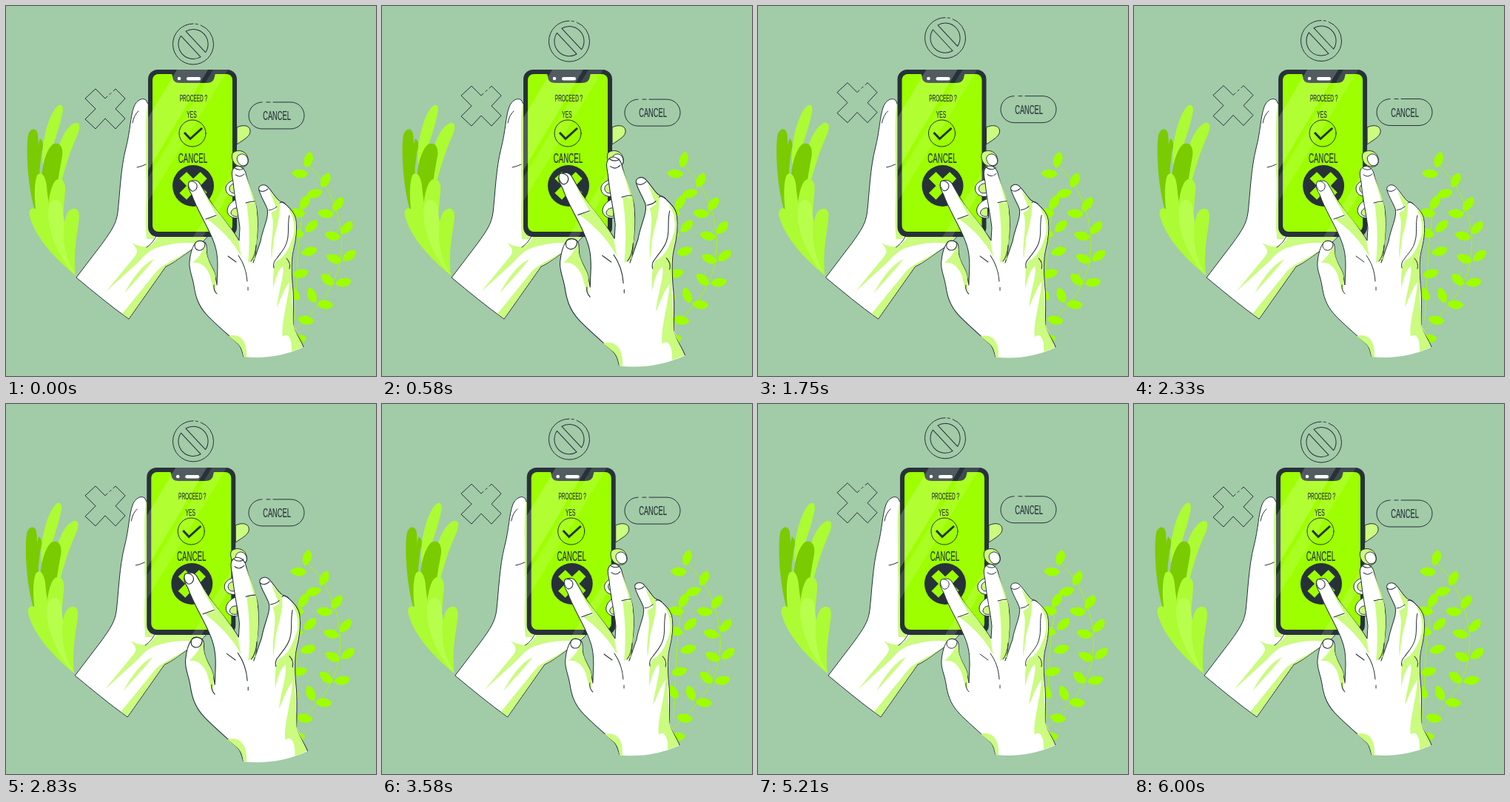
These frames come from a looping animation (500x500 px, 6.04 s). An HTML page:

```html
<!DOCTYPE html>
<html lang="en">
<head>
<meta charset="utf-8">
<title>Proceed or cancel</title>
<style>
  html, body { margin: 0; width: 100%; height: 100%; overflow: hidden; background: #a2cba8; }
  svg { display: block; width: 100%; height: 100%; }
  .line { fill: none; stroke: #263238; stroke-width: 1; stroke-linecap: round; stroke-linejoin: round; }
  .skin { fill: #fff; stroke: #263238; stroke-width: 1; stroke-linejoin: round; }
  .shade { fill: #cbfb7f; }
  .dark { fill: #263238; }
  .lime { fill: #9dff00; }
  .deep { fill: #7acb00; }
  .soft { fill: #acfb33; }
  .pale { fill: #b8ff4d; }
  text { font-family: "Liberation Sans", Arial, sans-serif; text-anchor: middle; fill: #263238; stroke: #263238; stroke-width: .2; }
</style>
</head>
<body>
<svg viewBox="0 0 500 500">
  <defs>
    <path id="cross" d="M-13 -27L-27 -14L-13 0L-27 14L-13 27L0 13L14 27L27 13L14 0L27 -14L14 -27L0 -14Z"/>
    <path id="leaf" d="M-11 0C-8 -7 4 -9 11 -2C10 6 -4 9 -11 0Z"/>
    <clipPath id="body"><rect x="192" y="86" width="120" height="226" rx="13"/></clipPath>
  </defs>

  <g class="sway">
    <!-- left plant -->
    <path class="soft" d="M50 215C46 185 59 142 71 134C77 132 78 139 76 146C72 166 65 183 60 200Z"/>
    <path class="soft" d="M66 235C65 202 75 166 93 158C102 156 100 168 95 178C86 198 80 219 74 240Z"/>
    <path class="deep" d="M42 285C30 255 26 195 30 174C33 164 42 164 43 174C45 194 43 215 47 235L58 285Z"/>
    <path class="deep" d="M50 275C44 235 50 199 63 187C74 182 79 194 75 208C71 230 67 255 66 280Z"/>
    <path class="deep" d="M48 198C51 188 51 183 46 179C42 190 42 210 45 225Z"/>
    <path class="soft" d="M52 320C38 288 36 243 42 229C48 221 54 231 55 244C57 270 65 300 72 325Z"/>
    <path class="soft" d="M54 310C56 275 58 243 68 235C78 231 81 241 80 250C78 270 76 290 77 310Z"/>
    <path class="soft" d="M94 364C68 343 40 314 32 284C29 273 38 270 43 277C54 300 80 330 94 364Z"/>
    <path class="pale" d="M94 364C71 340 53 300 58 271C61 259 73 259 76 271C79 300 86 332 94 364Z"/>
    <path class="soft" d="M94 364C75 333 74 294 84 278C92 270 99 274 99 284C98 303 90 328 94 364Z"/>

    <!-- right plant -->
    <path d="M388 440C442 390 456 358 453 310C450 270 430 232 406 213M390 425C394 370 392 325 402 272C408 262 411 256 417 252M440 358L432 370M453 332L443 342M452 300L440 311M447 277L432 280" fill="none" stroke="#9dff00" stroke-width="1"/>
    <g id="vine" class="lime"></g>

    <!-- holding hand -->
    <path class="skin" d="M95 367L130 321C143 303 149 294 151 279C154 253 155 219 162 192C168 169 168 149 173 136C176 128 184 123 189 127C193 132 192 139 192 150L197 305H277C271 315 263 321 253 328C239 337 226 348 216 352L166 423C142 406 118 386 95 367Z"/>
    <path class="shade" d="M191 132C187 160 190 190 189 225C191 255 187 280 190 315L200 315L198 135Z"/>
    <path class="shade" d="M170 320C181 326 190 327 197 322C203 316 206 312 208 307H275C270 314 264 318 257 321C239 318 218 322 203 327C194 330 187 337 180 345L135 386L172 341C179 333 179 329 170 320Z"/>
    <path class="shade" d="M200 342C184 350 173 365 160 388C174 372 188 358 200 342Z"/>
    <path class="shade" d="M254 326C242 335 227 347 216 351L166 422L157 416L204 358C214 348 230 343 254 326Z"/>
    <path class="line" d="M204 308C201 316 197 321 190 326M177 218Q183 217 189 214M171 158Q173 147 179 142"/>

    <!-- phone -->
    <rect class="dark" x="192" y="86" width="120" height="226" rx="13"/>
    <rect class="lime" x="198" y="92" width="108" height="213" rx="8"/>
    <path class="dark" d="M222 91H284Q282 92 282 95Q281 104 271 104H235Q225 104 225 95Q225 92 222 91Z"/>
    <g clip-path="url(#body)" fill="#fff">
      <path opacity=".2" d="M231 86H273L192 222V151Z"/>
      <path opacity=".12" d="M280 86H300L192 264V232Z"/>
      <path opacity=".14" d="M312 214V236L266 312H253Z"/>
    </g>
    <circle cx="234" cy="98" r="2.3" fill="#fff"/>
    <rect x="244" y="96" width="19" height="4.5" rx="2.2" fill="#fff"/>
    <g id="screen"></g>
    <circle class="line" cx="252" cy="172" r="18"/>
    <path d="M241 171L249 179.500L265 165" fill="none" stroke="#263238" stroke-width="3"/>
    <circle class="dark" cx="253" cy="243" r="28"/>
    <use href="#cross" class="lime" transform="translate(253 243) scale(.69)"/>

    <!-- fingertips round the edge -->
    <path class="skin" style="fill:#cbfb7f" d="M312 164C320 160 329 161 330 168C331 176 322 180 312 187Z"/>
    <path class="skin" style="fill:#cbfb7f" d="M306 199C312 193 323 195 326 203C330 212 325 218 318 217C310 217 303 208 306 199Z"/>
    <path class="skin" d="M314 202C320 197 326 202 327 208C328 215 320 218 316 214C312 210 311 205 314 202Z"/>
    <path class="skin" d="M314 234C306 235 299 238 297 245C296 254 304 259 314 257Z"/>
    <path class="skin" style="fill:#cbfb7f" d="M312 240C306 239 301 243 302 248C303 253 308 254 313 252Z"/>
    <path class="skin" d="M315 260C308 262 300 267 299 276C299 284 307 288 315 286Z"/>
    <path class="skin" style="fill:#cbfb7f" d="M314 273C308 272 304 276 304 280C305 284 310 285 314 284Z"/>
  </g>

  <!-- pressing hand -->
  <g id="press">
    <path fill="#fff" d="M320 470L321 474C349 477 376 473 402 461L388 430Z"/>
    <path class="skin" d="M321 474C319 466 318 461 314 457C300 444 281 428 271 417C259 404 256 391 254 378C252 365 247 357 248 346C249 335 252 325 256 320C260 315 270 317 271 324C272 330 270 333 273 341C276 351 283 358 283 366L285 377L286 352C286 335 284 326 278 312C270 293 258 275 251 255C247 248 245 244 247 240C250 234 259 235 262 240C268 250 275 264 283 274C292 286 306 302 315 317L316 300C314 280 309 262 307 238C305 228 304 222 309 218C315 214 322 219 324 226C327 240 337 262 339 275C341 290 340 310 338 322C338 332 336 341 334 347L344 318C347 300 356 285 353 274C349 264 344 257 342 249C340 243 347 240 352 243C357 247 360 253 366 260C370 266 374 264 378 268C384 274 391 280 392 290C394 305 391 320 388 332C385 345 386 365 388 385C389 400 388 420 388 432C392 444 398 450 402 461"/>
    <g class="shade">
      <path d="M267 251C280 273 301 293 314 317L318 339C307 318 291 302 271 287L285 285C281 275 273 265 267 251Z"/>
      <path d="M324 228C331 248 339 264 339 280C341 300 339 320 336 342L327 347C330 320 329 294 325 265L335 267Z"/>
      <path d="M356 250C362 258 369 263 370 266C371 290 363 304 361 322L359 342C356 320 365 294 358 280L366 275Z"/>
      <path d="M381 274C391 280 393 292 391 309C389 327 386 331 385 346L386 385L388 430C391 442 398 452 401 461L386 467C387 446 379 441 374 447C371 430 381 402 383 373C376 381 371 397 366 407C368 387 377 361 374 352C368 355 363 372 361 383C361 364 361 350 366 344C377 340 384 325 389 308C391 294 387 282 381 274Z"/>
      <path d="M301 446C315 442 326 451 325 474H321C320 466 318 461 314 457Z"/>
      <path d="M269 321C272 331 270 334 273 341C276 351 283 359 283 366V387C277 377 278 366 272 357C266 348 260 346 252 347C259 341 266 334 269 321Z"/>
    </g>
    <path class="skin" d="M248 237C252 236 257 238 258 242C259 247 255 251 251 250C247 247 245 241 248 237Z"/>
    <path class="skin" d="M256 320C259 316 267 317 269 321C269 327 265 331 260 330C255 329 254 324 256 320Z"/>
    <path class="line" d="M309 219C313 222 319 222 321 219M310 228Q316 233 322 227M342 249Q348 253 354 247M270 288Q278 285 284 283M324 266Q331 264 336 264M355 276Q362 275 366 271M378 268Q373 263 370 266M383 283C380 295 383 307 380 317C378 328 369 336 366 341Q360 347 362 354M300 338L311 346M314 337C321 347 325 357 326 372M327 380V384M281 377Q280 384 285 389M338 323Q337 338 331 345M379 341Q385 347 383 355"/>
  </g>

  <!-- floating signs -->
  <g id="signs">
    <g class="line">
      <path d="M145 115L148 112L161 125L148 139L161 152L148 166L134 152L121 166L107 153L121 139L107 125L121 112L134 125L137 122M140 119.500L142 117.500"/>
      <path d="M361 130H385A18 18 0 0 1 385 166H346A18 18 0 0 1 346 130M352 130H357"/>
      <g transform="translate(253 51.500)">
        <circle r="27.500" pathLength="360" stroke-dasharray="271 5 8 7 69 0" stroke-linecap="butt"/>
        <path transform="rotate(47)" d="M-19.500 -4.500A20 20 0 0 1 19.500 -4.500ZM-19.500 4.500A20 20 0 0 0 19.500 4.500Z"/>
      </g>
    </g>
  </g>
</svg>
<script>
  const LOOP = 6040, CYCLE = 6000;
  const NS = "http://www.w3.org/2000/svg";
  const $ = (q) => document.querySelector(q);

  function add(parent, tag, attrs, text) {
    const el = document.createElementNS(NS, tag);
    for (const k in attrs) el.setAttribute(k, attrs[k]);
    if (text) el.textContent = text;
    parent.appendChild(el);
    return el;
  }

  // All labels share one narrow letter style.
  function label(parent, text, x, y, size) {
    add(parent, "text", { transform: `translate(${x} ${y}) scale(.54 1)`, "font-size": size }, text);
  }
  label($("#screen"), "PROCEED ?", 253.5, 128.5, 12);
  label($("#screen"), "YES", 251, 150.5, 12.5);
  label($("#screen"), "CANCEL", 252.5, 211.5, 18);
  label($("#signs"), "CANCEL", 366, 154, 17.2);

  // Leaves: x, y, angle
  const leaves = [
    [409, 208, -72], [397, 227, 5], [432, 236, -62], [404, 266, -58], [417, 253, 165],
    [432, 281, 8], [449, 268, -50], [413, 298, -42], [461, 300, -48], [441, 311, 15],
    [410, 332, -15], [464, 338, -35], [443, 342, 25], [398, 362, -12], [434, 370, 42],
    [456, 374, -8], [413, 391, 70], [431, 404, 8], [405, 425, 12], [393, 280, 10],
    [392, 307, 20], [389, 389, 55], [395, 450, 0]
  ];
  for (const [x, y, a] of leaves)
    add($("#vine"), "use", { href: "#leaf", transform: `translate(${x} ${y}) rotate(${a})` });

  // Tables of [share of the cycle, value], joined by straight lines
  const SWAY = [[0, 0], [.1, -1], [.2, 2], [.3, -4], [.4, 4], [.5, -4], [.6, 4], [.7, -4], [.8, 2], [.9, -1], [1, 0]];
  const PRESS = [[0, 1], [.1, 1.1], [.3, 1], [.4, 1], [.5, 1.1], [.6, 1], [1, 1]];
  const FLOAT = [[0, 0], [.25, -10], [.5, 0], [.75, -10], [1, 0]];

  function at(steps, p) {
    const i = steps.findIndex((s) => s[0] > p);
    const [p0, a] = steps[i - 1], [p1, b] = steps[i];
    return a + (b - a) * (p - p0) / (p1 - p0);
  }

  const sway = $(".sway"), press = $("#press"), signs = $("#signs");
  function draw() {
    const p = (performance.now() % LOOP) % CYCLE / CYCLE;
    sway.setAttribute("transform", `translate(${at(SWAY, p)} 0)`);
    press.setAttribute("transform", `translate(324 346) scale(${at(PRESS, p)}) translate(-324 -346)`);
    signs.setAttribute("transform", `translate(0 ${at(FLOAT, p)})`);
    requestAnimationFrame(draw);
  }
  draw();
</script>
</body>
</html>
```
